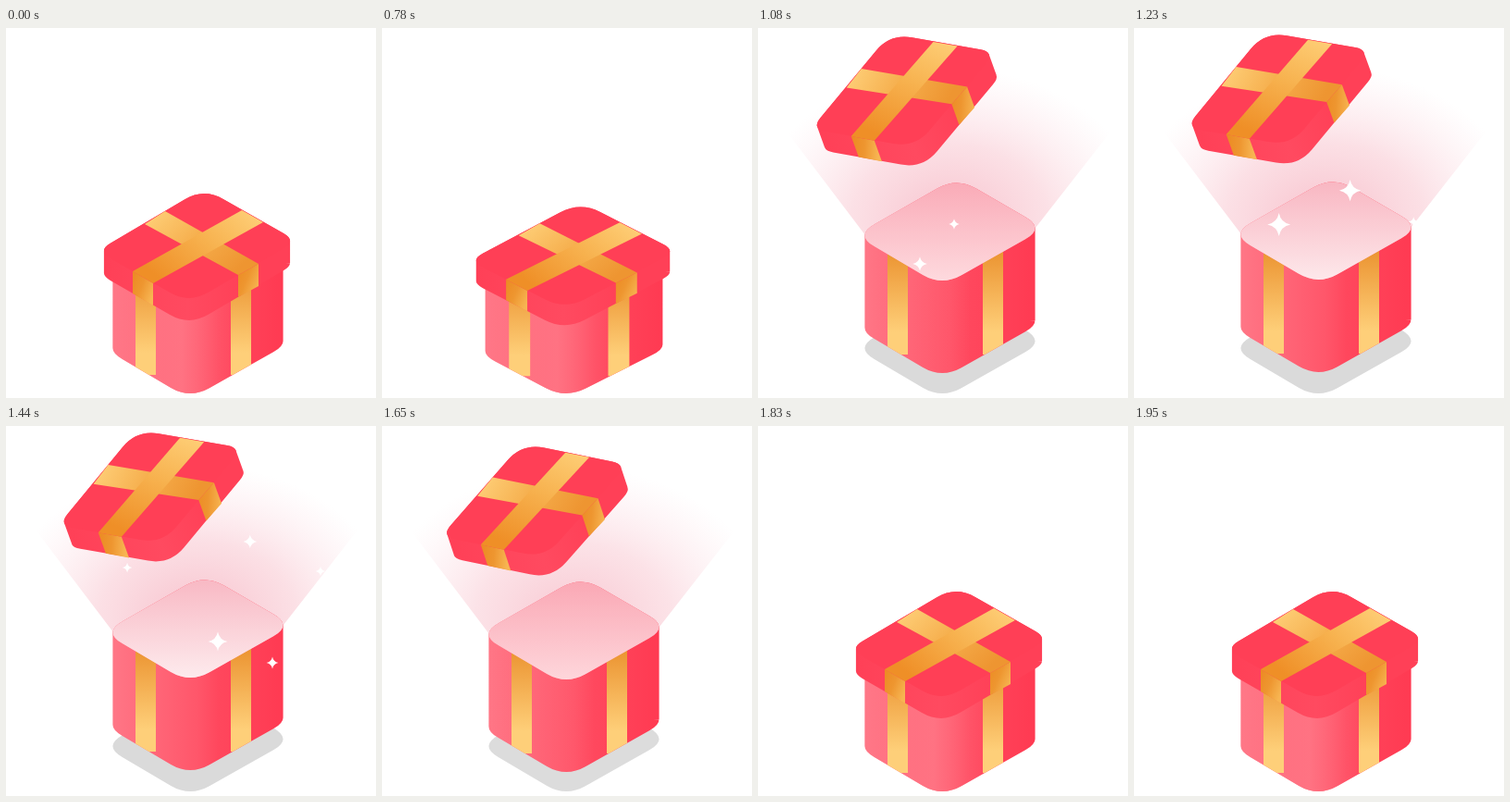
An HTML page that plays this animation: 400 px wide and 400 px high, repeating every 2.7 s.

```html
<!DOCTYPE html>
<html>
<head>
<meta charset="utf-8">
<title>Gift box</title>
<style>
html, body { margin: 0; width: 100%; height: 100%; overflow: hidden; background: #fff; }
svg { display: block; width: 100vw; height: 100vh; }
</style>
</head>
<body>
<svg viewBox="0 0 400 400">
  <defs>
    <linearGradient id="bodyFill">
      <stop offset="0" stop-color="#ff7686"/><stop offset=".5" stop-color="#ff566a"/>
      <stop offset=".62" stop-color="#ff475d"/><stop offset="1" stop-color="#ff3a52"/>
    </linearGradient>
    <linearGradient id="blushFill">
      <stop offset="0" stop-color="#ff7c8b" stop-opacity=".3"/><stop offset=".5" stop-color="#ff7c8b"/>
      <stop offset="1" stop-color="#ff5c70" stop-opacity="0"/>
    </linearGradient>
    <linearGradient id="sideFill">
      <stop offset="0" stop-color="#ff4057"/><stop offset=".45" stop-color="#ff4a60"/>
      <stop offset=".75" stop-color="#ff4057"/>
    </linearGradient>
    <linearGradient id="insideFill" x2="0" y2="1">
      <stop offset="0" stop-color="#ff8191"/><stop offset="1" stop-color="#ffa6b1"/>
    </linearGradient>
    <linearGradient id="paleFill" x2="0" y2="1">
      <stop offset="0" stop-color="#f8bcc7"/><stop offset="1" stop-color="#fdeef0"/>
    </linearGradient>
    <radialGradient id="beamFill" gradientUnits="userSpaceOnUse" cx="0" cy="0" r="1"
      gradientTransform="translate(207 230) scale(212 165)">
      <stop offset="0" stop-color="#f6b6c3" stop-opacity=".85"/>
      <stop offset=".5" stop-color="#f8c0cb" stop-opacity=".5"/>
      <stop offset="1" stop-color="#fbd5dd" stop-opacity="0"/>
    </radialGradient>
    <linearGradient id="stripFill" x2="0" y2="1">
      <stop offset=".1" stop-color="#ec9634"/><stop offset=".8" stop-color="#fecf79"/>
    </linearGradient>
    <linearGradient id="downFill" x2="1" y2=".6">
      <stop offset="0" stop-color="#ffd27c"/><stop offset=".5" stop-color="#f6b04f"/><stop offset="1" stop-color="#ee9531"/>
    </linearGradient>
    <linearGradient id="upFill" x1="1" x2="0" y2=".6">
      <stop offset="0" stop-color="#ffd27c"/><stop offset=".5" stop-color="#f7b24f"/><stop offset="1" stop-color="#ef8f27"/>
    </linearGradient>
    <linearGradient id="foldFill" x2="1" y2=".7">
      <stop offset="0" stop-color="#ec8a22"/><stop offset=".5" stop-color="#ee9630"/><stop offset="1" stop-color="#f7b552"/>
    </linearGradient>
    <clipPath id="bodyClip"><path id="clipShape"/></clipPath>
  </defs>
  <path id="shadow" fill="#dadada"/>
  <g id="squash">
    <g id="base">
      <path id="beam" fill="url(#beamFill)" d="M116 246L28 130V70H386V128L300 238L215 190Z"/>
      <path id="body" fill="url(#bodyFill)"/>
      <g clip-path="url(#bodyClip)">
        <rect id="blush" x="115" y="240" width="150" height="160" fill="url(#blushFill)"/>
        <rect x="140" y="255" width="22" height="120" fill="url(#stripFill)"/>
        <rect x="243" y="255" width="22" height="120" fill="url(#stripFill)"/>
      </g>
      <path id="inside" fill="url(#insideFill)"/>
      <path id="pale" fill="url(#paleFill)"/>
    </g>
  </g>
  <g id="stars" fill="#fff"></g>
  <g id="lidSquash">
    <g id="lid">
      <path id="lidSide" fill="url(#sideFill)"/>
      <path id="lidTop" fill="#ff3f56"/>
      <path fill="url(#foldFill)" d="M137 263L159 276V300L137 287Z"/>
      <path fill="url(#foldFill)" d="M251 267L273 255V279L251 291Z"/>
      <path fill="url(#downFill)" d="M150 212L172 198L273 255L251 267Z"/>
      <path fill="url(#upFill)" d="M255 197L278 210L159 276L137 263Z"/>
    </g>
  </g>
</svg>
<script>
const LOOP = 2700, STEP = 30;
const $ = id => document.getElementById(id);

// Corners in the order top, right, bottom, left
const lidCorners = [[214, 173], [314, 230], [198, 298], [99, 241]];
const bodyCorners = [[215, 183.5], [310, 238.5], [199, 301], [105, 246]];

function toward([ax, ay], [bx, by], d) {
  const k = d / Math.hypot(bx - ax, by - ay);
  return [ax + (bx - ax) * k, ay + (by - ay) * k];
}

// Rounded face, plus the point halfway round each corner
function face(corners, radii, dy = 0) {
  const pts = corners.map(([x, y]) => [x, y + dy]);
  const mids = [];
  const d = pts.map((c, i) => {
    const a = toward(c, pts[(i + 3) % 4], radii[i % 2]);
    const b = toward(c, pts[(i + 1) % 4], radii[i % 2]);
    mids.push([0, 1].map(k => (a[k] + 2 * c[k] + b[k]) / 4));
    return `${i ? 'L' : 'M'}${a}Q${c} ${b}`;
  }).join('') + 'Z';
  return { d, mids };
}

function extrude(corners, radii, depth) {
  const top = face(corners, radii), bottom = face(corners, radii, depth);
  const [, r, , l] = top.mids, [, r2, , l2] = bottom.mids;
  return `${top.d}${bottom.d}M${l}L${r}L${r2}L${l2}Z`;
}

const lidRadii = [24, 16], bodyRadii = [24, 24];
const set = (id, name, value) => $(id).setAttribute(name, value);
set('lidTop', 'd', face(lidCorners, lidRadii).d);
set('lidSide', 'd', extrude(lidCorners, lidRadii, 24));
set('shadow', 'd', face(bodyCorners, bodyRadii, 100).d);
for (const id of ['body', 'clipShape']) set(id, 'd', extrude(bodyCorners, bodyRadii, 100));
for (const id of ['inside', 'pale']) set(id, 'd', face(bodyCorners, bodyRadii).d);

// Tracks of [time, value]
const squashTrack = [[750, 0], [780, .75], [810, 1], [840, .6], [870, .2], [900, 0],
  [1830, 0], [1860, .75], [1890, 1], [1920, .5], [1950, 0]];
const riseTrack = [[840, 0], [870, 25], [930, 95], [960, 123], [990, 146], [1020, 160], [1080, 170],
  [1300, 173], [1440, 172], [1590, 170], [1620, 166], [1650, 157], [1680, 138], [1740, 81], [1800, 15], [1830, 0]];
const liftTrack = [[840, 0], [960, 18], [1020, 21], [1080, 22], [1300, 23.5], [1440, 23],
  [1620, 22], [1740, 18], [1770, 12], [1830, 0]];
const lightTrack = [[850, 0], [960, .4], [1080, .75], [1260, 1], [1530, 1], [1650, .7], [1740, .32], [1815, 0]];

function at(track, t) {
  const i = track.findIndex(([time]) => time >= t);
  if (i < 0) return track[track.length - 1][1];
  if (i === 0) return track[0][1];
  const [t0, a] = track[i - 1], [t1, b] = track[i];
  return a + (b - a) * (t - t0) / (t1 - t0);
}

const stars = [
  { time: 1080, x: 212, y: 212, vx: .144, vy: -.242, size: 12, born: 990, gone: 1560 },
  { time: 1080, x: 175, y: 255, vx: -.122, vy: -.283, size: 12.5, born: 960, gone: 1520 },
  { time: 1440, x: 229, y: 233, vx: .05, vy: -.25, size: 10.5, born: 1290, gone: 1600 },
  { time: 1440, x: 288, y: 256, vx: .1, vy: -.25, size: 8, born: 1350, gone: 1650 },
  { time: 1440, x: 340, y: 157, vx: .18, vy: -.25, size: 7, born: 1110, gone: 1560 },
];
for (const star of stars) {
  star.el = document.createElementNS('http://www.w3.org/2000/svg', 'path');
  star.el.setAttribute('d', 'M0-1Q.16-.16 1 0Q.16.16 0 1Q-.16.16-1 0Q-.16-.16 0-1Z');
  $('stars').append(star.el);
}

function draw(time) {
  const t = Math.floor((time % LOOP) / STEP) * STEP;
  const s = at(squashTrack, t), rise = at(riseTrack, t);
  const lift = at(liftTrack, t), light = at(lightTrack, t);
  const squash = `translate(206.5 394) scale(${1 + .055 * s} ${1 - .09 * s}) translate(-206.5 -394)`;
  set('squash', 'transform', squash);
  set('lidSquash', 'transform', squash);
  set('base', 'transform', `translate(0 ${-lift})`);
  set('lid', 'transform', `translate(${-.00176 * rise * rise} ${-rise}) rotate(${-.116 * rise} 213 233)`);
  set('shadow', 'opacity', Math.min(1, light * 1.35));
  set('beam', 'opacity', Math.min(1, light * 1.3));
  set('pale', 'opacity', light * .95);
  set('blush', 'opacity', .7 * (1 - Math.min(1, light * 1.3)));
  for (const { el, time, x, y, vx, vy, size, born, gone } of stars) {
    const age = (t - born) / (gone - born), dt = t - time;
    const r = age > 0 && age < 1 ? size * Math.sin(Math.PI * age) : 0;
    el.setAttribute('transform', `translate(${x + vx * dt} ${y + vy * dt}) scale(${r})`);
  }
}

const start = performance.now();
function tick() {
  draw(performance.now() - start);
  requestAnimationFrame(tick);
}
tick();
</script>
</body>
</html>
```
